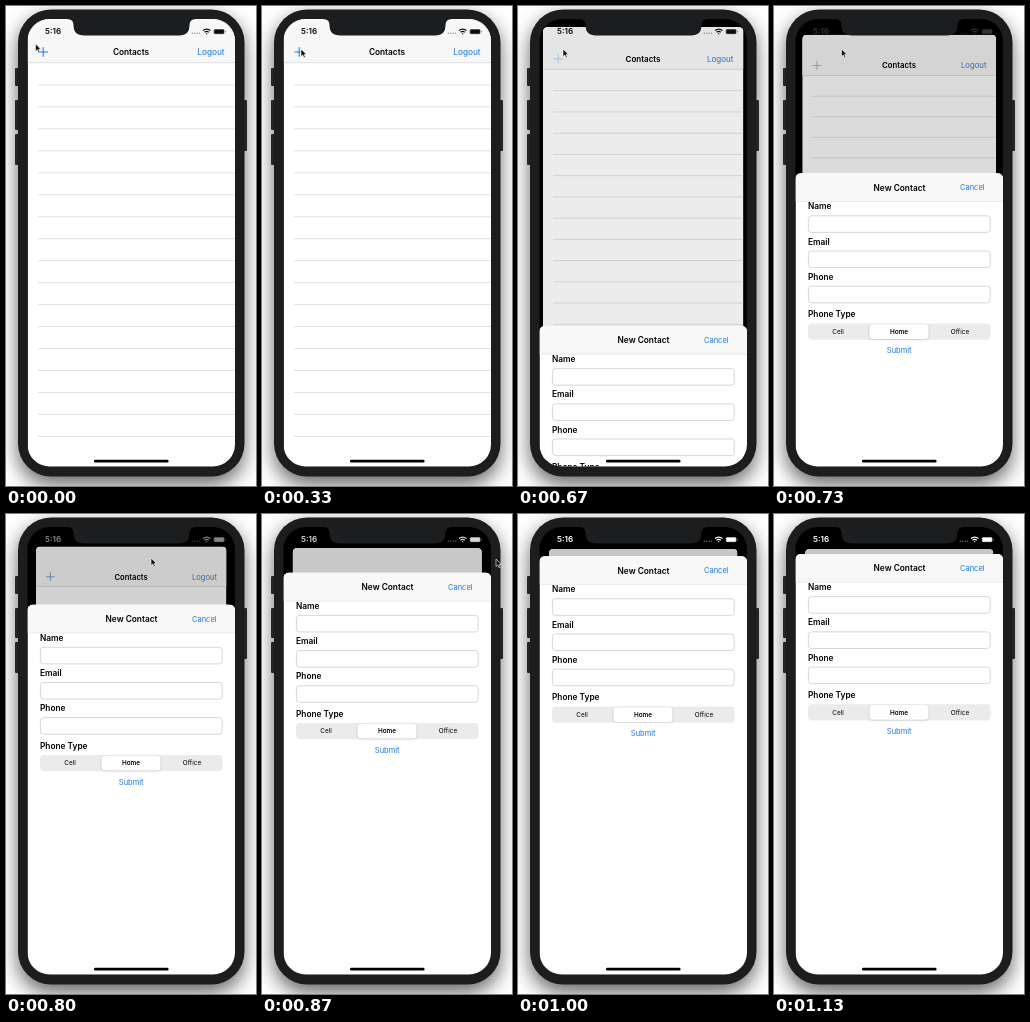
An HTML page for the animation above (1.79 s loop, 250 by 480 pixels).

```html
<!DOCTYPE html>
<html lang="en">
<head>
<meta charset="utf-8">
<title>New contact sheet</title>
<style>
  html, body { margin: 0; width: 100%; height: 100%; overflow: hidden; background: #fff; }
  svg { display: block; width: 100vw; height: 100vh; }
  text { font-family: Inter, Roboto, sans-serif; font-size: 8.3px; }
  .bold { font-weight: 600; }
  .mid { text-anchor: middle; }
  .tint { fill: #1778e2; font-size: 7.5px; }
  .seg { font-size: 6.4px; text-anchor: middle; }
  .field { fill: #fff; stroke: #cdcdcd; stroke-width: .8; }
</style>
</head>
<body>
<svg viewBox="0 0 250 480" xmlns="http://www.w3.org/2000/svg">
  <defs>
    <filter id="blur" x="-30%" y="-20%" width="160%" height="140%"><feGaussianBlur stdDeviation="10"/></filter>
    <filter id="soft" x="-10%" y="-30%" width="120%" height="170%"><feGaussianBlur stdDeviation=".9"/></filter>
    <clipPath id="screen"><rect x="21.5" y="13" width="207.5" height="447.5" rx="22"/></clipPath>
    <clipPath id="card"><path id="cardShape"/></clipPath>
  </defs>

  <rect width="250" height="480" fill="#fff"/>
  <rect x="12" y="11" width="226" height="468" rx="33" opacity=".6" filter="url(#blur)"/>

  <g fill="#242527">
    <rect x="9" y="62" width="5" height="18" rx="1"/>
    <rect x="9" y="94" width="5" height="30" rx="1"/>
    <rect x="9" y="128" width="5" height="31" rx="1"/>
    <rect x="236" y="94" width="5" height="51" rx="1"/>
  </g>
  <rect x="12" y="3.5" width="226.5" height="467" rx="33" fill="#1c1d1f"/>

  <g clip-path="url(#screen)">
    <rect x="20" y="12" width="210" height="450"/>
    <g id="back">
      <g clip-path="url(#card)">
        <rect x="21.5" y="13" width="207.5" height="448" fill="#fff"/>
        <rect x="21.5" y="13" width="207.5" height="43.5" fill="#f7f7f7"/>
        <path d="M21.5 56.7H229" stroke="#cfcfcf" stroke-width=".7"/>
        <path id="rows" stroke="#dedede" stroke-width=".9"/>
        <path id="plus" d="M32.5 46H42M37.2 41.2V50.8" stroke-width="1"/>
        <text class="bold mid" x="125" y="49">Contacts</text>
        <text id="logout" x="218.6" y="49" text-anchor="end">Logout</text>
        <rect id="dim" x="21" y="12" width="209" height="450"/>
      </g>
    </g>

    <g id="sheet">
      <rect x="21.5" y="0" width="207.5" height="470" rx="5.5" fill="#fff"/>
      <path d="M21.5 28V5.5Q21.5 0 27 0H223.5Q229 0 229 5.5V28Z" fill="#f8f8f8"/>
      <path d="M21.5 28.2H229" stroke="#dcdcdc" stroke-width=".6"/>
      <text class="bold mid" x="125.5" y="17.4">New Contact</text>
      <text class="tint" x="186" y="17.2">Cancel</text>
      <g id="form"></g>
      <rect x="34" y="150.3" width="182.5" height="16.2" rx="4" fill="#ebebec"/>
      <rect x="95.5" y="151.6" width="59" height="14.6" rx="3.5" opacity=".2" filter="url(#soft)"/>
      <rect x="95.5" y="151" width="59" height="14.8" rx="3.5" fill="#fff"/>
      <text class="seg" x="64" y="160.7">Cell</text>
      <text class="seg bold" x="125" y="160.7">Home</text>
      <text class="seg" x="186" y="160.7">Office</text>
      <text class="tint mid" x="125.2" y="180">Submit</text>
    </g>

    <g id="status">
      <text class="bold" x="39" y="28.3" style="font-size:8.1px">5:16</text>
      <g opacity=".4">
        <circle cx="186.3" cy="27.3" r=".75"/><circle cx="188.7" cy="27.3" r=".75"/>
        <circle cx="191.1" cy="27.3" r=".75"/><circle cx="193.5" cy="27.3" r=".75"/>
      </g>
      <g id="wifi" fill="none" stroke-width="1.3">
        <path d="M197 24.6Q200.7 21.6 204.4 24.6M198.6 26.2Q200.7 24.6 202.8 26.2"/>
        <path d="M200.2 27.6H201.2"/>
      </g>
      <rect x="207.6" y="22.9" width="11" height="5.4" rx="1.5" opacity=".4"/>
      <rect x="208.3" y="23.5" width="9.6" height="4.2" rx=".9"/>
      <rect x="219.1" y="24.7" width=".8" height="1.8" rx=".4" opacity=".5"/>
    </g>
    <rect x="88" y="453.8" width="74.5" height="2.7" rx="1.35"/>
  </g>

  <path d="M61 11V13Q67.5 13 67.5 19Q67.5 29.5 78 29.5H173Q183.5 29.5 183.5 19Q183.5 13 190 13V11Z" fill="#1c1d1f" id="notch"/>
  <path id="cursor" d="M0 0V7.6L1.8 6 3 8.7 4.3 8.1 3.1 5.5H5.4Z" fill="#111" stroke="#fff" stroke-width=".6"/>
</svg>

<script>
const LOOP = 1790, FPS = 15, LAST_TICK = 17;
const SCREEN = { x: 21.5, y: 13, w: 207.5, h: 448 };
const SHEET_Y = 39.8, TRAVEL = 440, OMEGA = 18.257, START = 0.597;
const $ = id => document.getElementById(id);
const clamp = v => Math.min(1, Math.max(0, v));
const mix = (a, b, p) => a + (b - a) * p;
const rgb = (a, b, p) => `rgb(${a.map((v, i) => Math.round(mix(v, b[i], p)))})`;

$("rows").setAttribute("d", Array.from({ length: 17 },
  (_, i) => `M32 ${78.9 + i * 21.97}H229`).join(""));

const label = (s, y) => `<text class="bold" x="34" y="${y}">${s}</text>`;
$("form").innerHTML = ["Name", "Email", "Phone"].map((s, i) => {
  const y = 36.2 + i * 35.2;
  return label(s, y) + `<rect class="field" x="34.4" y="${y + 6.4}" width="181.8" height="16.6" rx="3"/>`;
}).join("") + label("Phone Type", 144);

// Critically damped spring, 0 to 1
function spring(s) {
  const x = Math.max(0, s - START) * OMEGA;
  return 1 - (1 + x) * Math.exp(-x);
}

// Cursor stops: tick, x, y
const stops = [[0, 29.5, 37.8], [5, 39, 43], [9, 39, 43], [10, 45, 43], [11, 67.5, 43], [12, 145, 44], [13, 234, 45]];
function cursorAt(k) {
  let i = 0;
  while (i < stops.length - 2 && k > stops[i + 1][0]) i++;
  const a = stops[i], b = stops[i + 1];
  const p = clamp((k - a[0]) / (b[0] - a[0]));
  return [mix(a[1], b[1], p), mix(a[2], b[2], p)];
}

function plusAlpha(k) {
  return k < 8 ? 1 : k < 10 ? 0.15 : clamp(0.15 + (k - 9) * 0.2);
}

function draw(ms) {
  const k = Math.min(LAST_TICK, Math.floor(ms * FPS / 1000 + 0.06));
  const s = k / FPS, p = spring(s);

  const scale = mix(1, 0.908, p), cx = SCREEN.x + SCREEN.w / 2;
  $("back").setAttribute("transform",
    `translate(${cx} ${mix(SCREEN.y, 35, p)}) scale(${scale}) translate(${-cx} ${-SCREEN.y})`);
  const { x, y, w, h } = SCREEN, r = p > 0.01 ? 5.5 : 0;
  $("cardShape").setAttribute("d",
    `M${x} ${y + h}V${y + r}Q${x} ${y} ${x + r} ${y}H${x + w - r}Q${x + w} ${y} ${x + w} ${y + r}V${y + h}Z`);
  $("dim").setAttribute("opacity", 0.2 * p);

  const tint = rgb([23, 120, 226], [125, 130, 137], p * 0.6);
  $("logout").setAttribute("fill", tint);
  $("plus").setAttribute("stroke", tint);
  $("plus").setAttribute("opacity", plusAlpha(k));

  $("sheet").setAttribute("transform", `translate(0 ${SHEET_Y + TRAVEL * (1 - p)})`);

  const ink = rgb([12, 12, 12], [255, 255, 255], clamp((s - 0.7) / 0.2));
  $("status").setAttribute("fill", ink);
  $("wifi").setAttribute("stroke", ink);

  const [px, py] = cursorAt(k);
  $("cursor").setAttribute("transform", `translate(${px} ${py})`);
  $("cursor").setAttribute("visibility", k > 13 ? "hidden" : "visible");
}

const begin = performance.now();
function loop() {
  draw((performance.now() - begin) % LOOP);
  requestAnimationFrame(loop);
}
draw(0);
requestAnimationFrame(loop);
</script>
</body>
</html>
```
